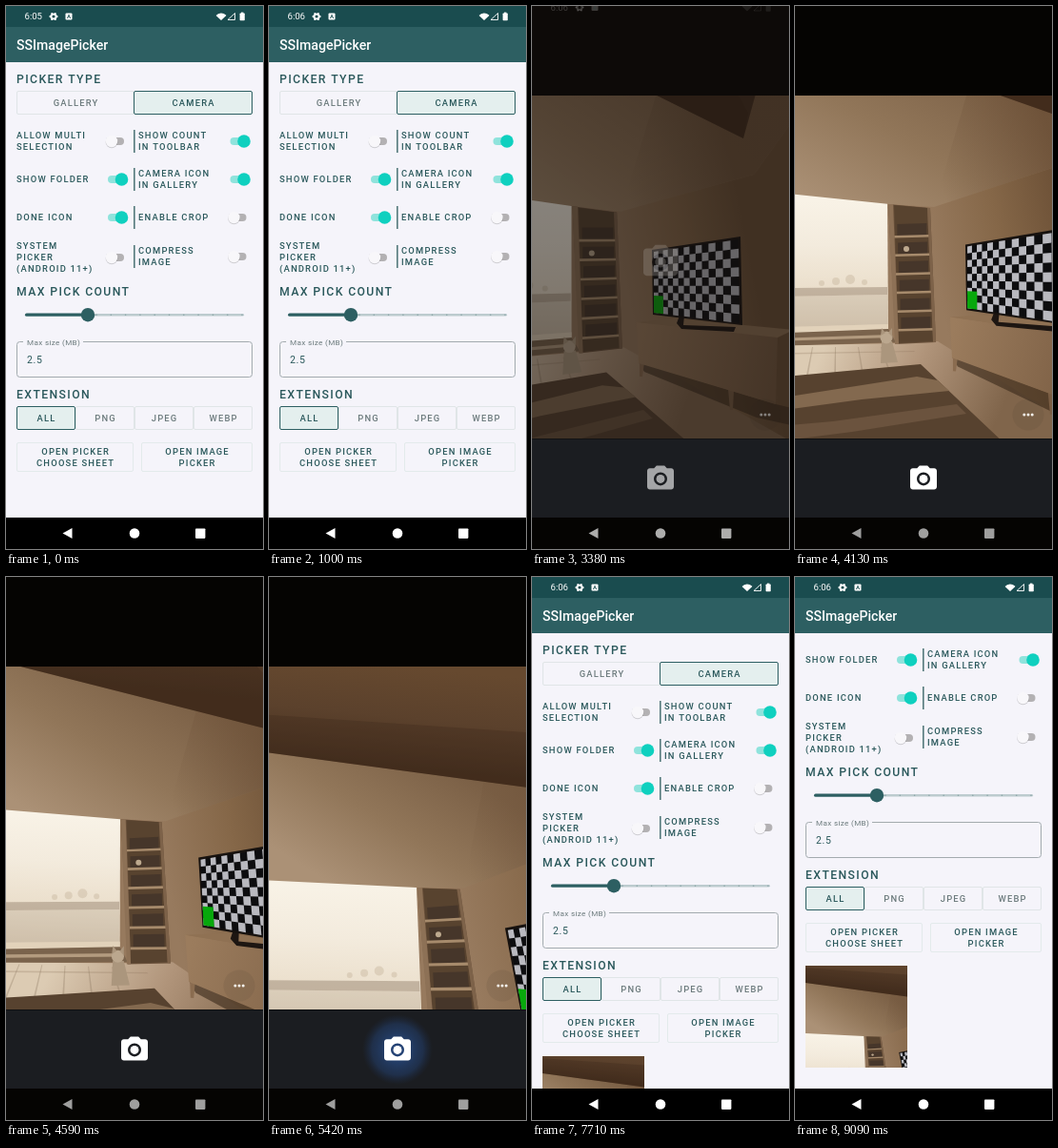
These frames come from a looping animation (270x570 px, 9.14 s). An HTML page with a canvas:

```html
<!DOCTYPE html>
<html lang="en">
<head>
<meta charset="utf-8">
<title>SSImagePicker</title>
<style>
html, body { margin: 0; width: 100%; height: 100%; overflow: hidden; background: #000; }
canvas { display: block; width: 270px; height: 570px; }
</style>
</head>
<body>
<canvas id="stage"></canvas>
<script>
const W = 270, H = 570, LOOP = 9140;
const canvas = document.getElementById('stage');
const ctx = canvas.getContext('2d');
const dpr = window.devicePixelRatio || 1;
canvas.width = W * dpr;
canvas.height = H * dpr;

const TEAL = '#2d5f62', DARK_TEAL = '#1a4c4f', INK = '#2a585b', GRAY = '#6b7a7c';
const PAPER = '#f5f4fa', SPLASH = '#1c2124', BAR = '#1b1d21', NIGHT = '#050402';

const clamp = v => Math.max(0, Math.min(1, v));
const span = (t, a, b) => clamp((t - a) / (b - a));
const lerp = (a, b, k) => a + (b - a) * k;
const easeOut = k => 1 - (1 - k) ** 3;
const easeInOut = k => k * k * (3 - 2 * k);

// ---------- drawing helpers ----------
function rect(x, y, w, h, color) {
  ctx.fillStyle = color;
  ctx.fillRect(x, y, w, h);
}
function disc(x, y, r, color) {
  ctx.fillStyle = color;
  ctx.beginPath();
  ctx.arc(x, y, r, 0, 7);
  ctx.fill();
}
function round(x, y, w, h, r, fill, stroke) {
  ctx.beginPath();
  ctx.roundRect(x, y, w, h, r);
  if (fill) { ctx.fillStyle = fill; ctx.fill(); }
  if (stroke) { ctx.strokeStyle = stroke; ctx.lineWidth = 1; ctx.stroke(); }
}
function shape(pts, color) {
  ctx.fillStyle = color;
  ctx.beginPath();
  pts.forEach(p => ctx.lineTo(p[0], p[1]));
  ctx.closePath();
  ctx.fill();
}
// y is the middle of the capital letters
function text(s, x, y, { size = 9.4, weight = 500, color = INK, gap = 1.2, align = 'left' } = {}) {
  ctx.font = `${weight} ${size}px Roboto, sans-serif`;
  ctx.letterSpacing = gap + 'px';
  ctx.textAlign = align;
  ctx.fillStyle = color;
  ctx.fillText(s, x, y + size * 0.355);
}
function layer(alpha, scale, draw) {
  if (alpha <= 0) return;
  ctx.save();
  ctx.globalAlpha *= alpha;
  ctx.translate(W / 2, H / 2);
  ctx.scale(scale, scale);
  ctx.translate(-W / 2, -H / 2);
  draw();
  ctx.restore();
}

// ---------- room seen by a turning camera ----------
const F = 263, CX = 135, CY = 274;
const START = [-0.2, 0.02], FRONT = [0, 0], UP = [0.22, 0.44];

function ray(x, y, [yaw, pitch]) {
  const u = x - CX, v = y - CY;
  const b = v * Math.cos(pitch) - F * Math.sin(pitch);
  const z = v * Math.sin(pitch) + F * Math.cos(pitch);
  return [u * Math.cos(yaw) - z * Math.sin(yaw), b, u * Math.sin(yaw) + z * Math.cos(yaw)];
}
function project([x, y, z], [yaw, pitch]) {
  const a = x * Math.cos(yaw) + z * Math.sin(yaw);
  const c = z * Math.cos(yaw) - x * Math.sin(yaw);
  const d = Math.max(5, c * Math.cos(pitch) - y * Math.sin(pitch));
  return [CX + F * a / d, CY + F * (y * Math.cos(pitch) + c * Math.sin(pitch)) / d];
}
function rays(view, ...n) {
  const out = [];
  for (let i = 0; i < n.length; i += 2) out.push(ray(n[i], n[i + 1], view));
  return out;
}
const front = (...n) => rays(FRONT, ...n);
const start = (...n) => rays(START, ...n);
const up = (...n) => rays(UP, ...n);

function cameraPose(t) {
  const [from, to, k] = t < 4130
    ? [START, FRONT, span(t, 3460, 4130)]
    : [FRONT, UP, span(t, 4160, 5280)];
  return [lerp(from[0], to[0], k), lerp(from[1], to[1], k)];
}

const mix = (a, b, k) => a.map((v, i) => lerp(v, b[i], k));

function room(pose) {
  const at = r => project(r, pose);
  const poly = (r, color) => shape(r.map(at), color);
  const grad = ([a, b], ...colors) => {
    const g = ctx.createLinearGradient(...at(a), ...at(b));
    colors.forEach((c, i) => g.addColorStop(i / (colors.length - 1), c));
    return g;
  };
  ctx.save();
  ctx.beginPath();
  ctx.rect(0, 94, W, 360);
  ctx.clip();

  rect(0, 94, W, 360, grad(front(145, 270, 290, 240), '#977a5e', '#856748', '#6c5036'));

  // ceiling and the dark beam above
  poly([...up(-60, 320), ...front(98, 208, 146, 211, 300, 160, 420, 0), ...up(320, 40, -40, 40)],
    grad(up(70, 325, 160, 180), '#ab9176', '#917659', '#7b6046'));
  poly(front(146, 211, 300, 160, 420, 0, 190, 60),
    grad(front(150, 180, 270, 140), 'rgba(120,92,66,0)', 'rgba(108,80,55,.85)'));
  poly([...up(-40, 179, -40, 40, 310, 40), ...start(244, 60, 222, 139)],
    grad(up(140, 94, 130, 200), '#66492f', '#5b412c', '#46301f'));
  poly([...up(-40, 179, -40, 142, 270, 163), ...start(227, 112, 222, 139)], 'rgba(55,35,22,.25)');

  // window
  poly([...up(-30, 317, 155, 326), ...front(98, 340, -80, 349)],
    grad(front(50, 205, 50, 342), '#f8f2e6', '#f3ebdd', '#ebdfcc', '#d6c6b0'));
  poly(front(-80, 297, 97, 295, 97, 303, -80, 306), 'rgba(160,142,122,.55)');
  poly(front(-80, 306, 97, 303, 97, 334, -80, 339), 'rgba(190,176,156,.35)');
  for (let i = 0; i < 4; i++) {
    const [x, y] = at(ray(28 + i * 15, 291 - (i * 7) % 5, FRONT));
    disc(x, y, 3 + i % 3, 'rgba(196,178,152,.4)');
  }
  poly(front(-80, 339, 98, 334, 98, 339, -80, 346), '#e2d2ba');
  poly(front(-80, 346, 98, 339, 106, 353, -80, 359), '#7a634c');
  poly(front(-80, 351, 100, 345, 102, 348, -80, 354), '#b39b7f');

  // floor and rug
  poly(front(-120, 359, 106, 354, 150, 352, 420, 520, 420, 560, -120, 560),
    grad(front(30, 360, 210, 440), '#dccbb3', '#b0947a', '#80654b'));
  for (let i = 0; i < 6; i++)
    poly(front(i * 24 - 30, 358, i * 24 - 29, 358, i * 30 - 47, 392, i * 30 - 49, 392), 'rgba(130,108,86,.3)');
  poly(front(-120, 366, 125, 362, 126, 363, -120, 368), 'rgba(130,108,86,.25)');
  poly(front(-120, 398, 0, 388, 132, 376, 240, 478, -120, 500), '#57422f');
  poly(front(-120, 421, 0, 409, 128, 389, 150, 393, 162, 404, 70, 413, -120, 439), '#83694f');
  poly(front(-120, 450, 40, 436, 170, 418, 180, 428, 60, 447, -120, 470), '#6b533e');

  // ladder shelf
  poly(front(98, 208, 142, 212, 148, 353, 106, 355), '#6b523c');
  poly(front(104, 209, 139, 212, 145, 352, 109, 354), '#58432f');
  const rowL = k => 103 + k * 6, rowR = k => 140 + k * 6;
  for (let i = 0; i < 6; i++) {
    const y = 241 + i * 19.6, k = (y - 208) / 146, l = rowL(k), r = rowR(k);
    poly(front(l + 3, y - 12, r - 3, y - 13, r - 3, y, l + 3, y), '#46362a');
    poly(front(l, y, r, y - 1, r, y + 1.5, l, y + 2.5), '#a78b6c');
  }
  disc(...at(ray(117, 255, FRONT)), 3, '#bda98e');
  poly(front(98, 208, 103, 208, 109, 355, 105, 355), '#8d7156');
  poly(front(139, 212, 142, 212, 148, 353, 145, 353), '#7d6249');

  // small pale figure
  poly(front(91, 352, 102, 352, 108, 374, 90, 375), '#ab967d');
  disc(...at(ray(96, 348, FRONT)), 6.5, '#bba78e');
  poly(front(90, 346, 91, 338, 95, 343), '#ab967d');
  poly(front(98, 343, 102, 338, 102, 347), '#ab967d');

  // cabinet and its shadow
  poly(start(112, 374, 256, 418, 300, 428, 300, 446, 236, 432, 118, 384), 'rgba(58,40,26,.6)');
  poly(start(113, 372, 118, 374, 116, 389, 113, 389), '#8a6c50');
  poly(start(206, 402, 212, 404, 211, 424, 208, 424), '#7a5d43');
  poly(start(110, 332, 258, 347, 256, 418, 112, 375), grad(start(112, 350, 256, 380), '#9b7c5d', '#775a40'));
  poly(start(110, 332, 150, 328, 275, 340, 258, 348), '#8f7153');

  // television with checkerboard
  poly(start(152, 333, 155, 325, 160, 325, 159, 335, 214, 337, 212, 342, 157, 339), '#1d1612');
  poly(start(126, 256, 219, 242, 221, 335, 127, 324), '#17120f');
  const [a, b, c, d] = start(128, 258, 217, 245, 218, 333, 128, 322);
  const far = r => r.map(v => v * 1.38);
  const A = far(a), D = far(d), COLS = 14, ROWS = 9;
  const cell = (u0, v0, u1, v1, color) => {
    const p = (u, v) => mix(mix(A, b, u), mix(D, c, u), v);
    poly([p(u0, v0), p(u1, v0), p(u1, v1), p(u0, v1)], color);
  };
  cell(0, 0, 1, 1, '#0d0d0f');
  for (let i = 0; i < COLS; i++)
    for (let j = i % 2; j < ROWS; j += 2)
      cell(i / COLS, j / ROWS, (i + 1) / COLS, (j + 1) / ROWS, '#b9b9bf');
  cell(0, 0.72, 0.145, 1, '#08a80c');
  ctx.restore();
}

// ---------- settings form ----------
function toggle(x, y, on) {
  round(x, y - 4, on ? 20 : 17, 8, 4, on ? '#8fe3dc' : '#b3b1b3');
  if (!on) disc(x + 4, y + 0.8, 6.4, 'rgba(0,0,0,.16)');
  disc(x + (on ? 14.5 : 4), y, on ? 6.8 : 6.2, on ? '#0fd0bf' : '#f8f7fa');
}
function option(x, y, lines, on) {
  lines.forEach((s, i) => text(s, x, y + (i - (lines.length - 1) / 2) * 12));
  toggle(x < 100 ? 107 : 235.5, y, on);
  if (x > 100) rect(134, y - 12, 1.6, 24, '#54797b');
}
function tab(x, y, w, label, active) {
  round(x + 0.5, y + 0.5, w - 1, 24, 1.5, active && '#e4efee', active ? TEAL : '#e0e5e7');
  text(label, x + w / 2 + 0.6, y + 13, { color: active ? INK : GRAY, align: 'center' });
}
const heading = (s, y) => text(s, 11, y, { size: 12.2, gap: 1.4 });

function action(x, w, lines) {
  round(x + 0.5, 458.5, w - 1, 30, 1.5, null, '#e3eaeb');
  lines.forEach((s, i) => text(s, x + w / 2 + 0.6, 468 + i * 12, { align: 'center' }));
}

function form(scroll, photo) {
  rect(0, 0, W, H, PAPER);
  ctx.save();
  ctx.beginPath();
  ctx.rect(0, 59, W, 478);
  ctx.clip();
  ctx.translate(0, -scroll);

  heading('PICKER TYPE', 77);
  tab(11, 89, 124, 'GALLERY', false);
  tab(134, 89, 125, 'CAMERA', true);
  option(11, 142, ['ALLOW MULTI', 'SELECTION'], false);
  option(139, 142, ['SHOW COUNT', 'IN TOOLBAR'], true);
  option(11, 182, ['SHOW FOLDER'], true);
  option(139, 182, ['CAMERA ICON', 'IN GALLERY'], true);
  option(11, 222, ['DONE ICON'], true);
  option(139, 222, ['ENABLE CROP'], false);
  option(11, 264, ['SYSTEM', 'PICKER', '(ANDROID 11+)'], false);
  option(139, 263, ['COMPRESS', 'IMAGE'], false);

  heading('MAX PICK COUNT', 300);
  round(86, 323, 164, 2.4, 1.2, '#bccbce');
  for (let i = 0; i < 11; i++) disc(95 + i * 15.3, 324.2, 0.8, '#8ba5a8');
  round(20, 322.6, 66, 3.2, 1.6, TEAL);
  disc(86, 324.2, 7.2, TEAL);

  round(11.5, 352.5, 247, 37, 3, null, '#a3abae');
  rect(18, 350, 63, 6, PAPER);
  text('Max size (MB)', 22, 353, { size: 8.1, weight: 400, color: GRAY, gap: 0.35 });
  text('2.5', 22, 371.5, { size: 10.5, weight: 400, gap: 0.7 });

  heading('EXTENSION', 408);
  ['ALL', 'PNG', 'JPEG', 'WEBP'].forEach((s, i) => tab(11 + i * 62, 420, 62, s, i === 0));

  action(11, 123, ['OPEN PICKER', 'CHOOSE SHEET']);
  action(142, 117, ['OPEN IMAGE', 'PICKER']);

  if (photo) {
    ctx.beginPath();
    ctx.rect(11, 503, 107, 107);
    ctx.clip();
    ctx.translate(11, 503);
    ctx.scale(107 / 270, 107 / 270);
    ctx.translate(0, -139);
    room(UP);
  }
  ctx.restore();

  rect(0, 0, W, 22, DARK_TEAL);
  rect(0, 22, W, 37, TEAL);
  text('SSImagePicker', 11, 41, { size: 14.1, color: '#fff', gap: 0 });
  rect(0, 537, W, 33, '#000');
}

// ---------- camera app ----------
const BODY = new Path2D('M9 2L7.17 4H4c-1.1 0-2 .9-2 2v12c0 1.1.9 2 2 2h16c1.1 0 2-.9 2-2V6c0-1.1-.9-2-2-2h-3.17L15 2H9z' +
  'M12 17a5 5 0 1 1 0-10a5 5 0 1 1 0 10z');

function cameraIcon(x, y, scale, color, alpha) {
  ctx.save();
  ctx.globalAlpha *= alpha;
  ctx.translate(x, y);
  ctx.scale(scale, scale);
  ctx.translate(-12, -11);
  ctx.fillStyle = color;
  ctx.fill(BODY, 'evenodd');
  disc(12, 12, 3.2, color);
  ctx.restore();
}

function cameraApp(t) {
  if (t < 3000) {
    rect(0, 0, W, H, SPLASH);
    cameraIcon(135, 267, 1.8, '#8d8c88', 0.6 * span(t, 2500, 2700));
    return;
  }
  const shown = span(t, 3180, 3580);
  rect(0, 0, W, H, NIGHT);
  room(cameraPose(t));
  disc(245, 429, 16.5, 'rgba(60,48,38,.1)');
  for (let i = -1; i < 2; i++) disc(245 + i * 4.2, 429, 1.5, '#f4f1ec');
  ctx.globalAlpha *= 1 - shown;
  rect(0, 0, W, 455, '#14100e');
  ctx.globalAlpha = 1;
  cameraIcon(135, 267, 1.8, '#a9a299', 0.6 * (1 - shown));

  rect(0, 454.5, W, 82.5, BAR);
  rect(0, 537, W, 33, NIGHT);
  const press = span(t, 5300, 5400) * (1 - span(t, 5480, 5750));
  if (press > 0) {
    const g = ctx.createRadialGradient(135, 496, 8, 135, 496, 37);
    g.addColorStop(0, 'rgba(40,80,145,.75)');
    g.addColorStop(0.65, 'rgba(36,66,115,.5)');
    g.addColorStop(1, 'rgba(30,50,85,0)');
    ctx.globalAlpha = press;
    disc(135, 496, 37, g);
    ctx.globalAlpha = 1;
  }
  cameraIcon(135, 495, 1.4, '#fff', lerp(0.2, 1, shown));
}

// ---------- system icons ----------
function statusIcons(time, dy, alpha, right) {
  if (alpha <= 0) return;
  ctx.save();
  ctx.translate(0, dy);
  ctx.globalAlpha = alpha;
  text(time, 19.5, 11, { size: 9.6, weight: 400, color: '#fff', gap: 0 });
  ctx.strokeStyle = '#fff';
  ctx.lineWidth = 2;
  ctx.beginPath();
  ctx.arc(50, 11, 2.6, 0, 7);
  ctx.stroke();
  for (let i = 0; i < 6; i++) {
    const a = i * Math.PI / 3;
    disc(50 + 3.7 * Math.cos(a), 11 + 3.7 * Math.sin(a), 0.9, '#fff');
  }
  round(62.5, 7.5, 7, 7, 1, '#fff');
  text('A', 66, 11, { size: 6, weight: 700, color: DARK_TEAL, gap: 0, align: 'center' });

  ctx.globalAlpha = alpha * right;
  ctx.fillStyle = '#fff';
  ctx.beginPath();
  ctx.moveTo(226, 15);
  ctx.arc(226, 15, 7.4, -Math.PI * 0.76, -Math.PI * 0.24);
  ctx.fill();
  ctx.strokeStyle = '#fff';
  ctx.lineWidth = 0.9;
  ctx.beginPath();
  ctx.moveTo(233, 14.5);
  ctx.lineTo(240.5, 14.5);
  ctx.lineTo(240.5, 7.5);
  ctx.closePath();
  ctx.stroke();
  rect(247, 6.6, 2.4, 1.4, '#fff');
  round(245.6, 7.6, 5.2, 7.6, 0.7, '#fff');
  ctx.restore();
}
function navIcons(alpha) {
  ctx.globalAlpha = alpha;
  shape([[59.5, 553.5], [69.5, 548], [69.5, 559]], '#fff');
  disc(135, 553.5, 5.3, '#fff');
  round(199, 548.5, 10.4, 10.4, 0.8, '#fff');
  ctx.globalAlpha = 1;
}

// ---------- timeline ----------
const OPEN = 1691, CLOSE = 6708;

function draw(t) {
  ctx.setTransform(dpr, 0, 0, dpr, 0, 0);
  ctx.globalAlpha = 1;
  rect(0, 0, W, H, '#000');
  const time = t < 1000 ? '6:05' : '6:06';
  let dy = 0, alpha = 1, right = 1, nav = 1;

  if (t < OPEN + 400) {
    const k = easeOut(span(t, OPEN, OPEN + 400));
    layer(1, lerp(1, 1.05, k), () => form(0, false));
    layer(span(t, OPEN + 30, OPEN + 110), lerp(0.85, 1, k), () => rect(0, 0, W, H, SPLASH));
    right = lerp(1, 0.4, span(t, OPEN, OPEN + 130));
  } else if (t < CLOSE) {
    cameraApp(t);
    const hide = span(t, 3250, 3470);
    dy = -16 * hide;
    alpha = 1 - 1.35 * hide;
    right = 0.4;
    nav = lerp(1, 0.62, span(t, 3150, 3420));
  } else {
    const k = easeOut(span(t, CLOSE, CLOSE + 400));
    const scroll = 95 * easeInOut(span(t, 7900, 8500));
    layer(1, lerp(1.05, 1, k), () => form(scroll, true));
    layer(1 - span(t, CLOSE + 15, CLOSE + 78), lerp(1, 0.85, k), () => {
      rect(0, 0, W, H, NIGHT);
      room(UP);
      rect(0, 454.5, W, 82.5, BAR);
      cameraIcon(135, 495, 1.4, '#fff', 1);
    });
    alpha = span(t, 6800, 7050);
    nav = lerp(0.62, 1, span(t, CLOSE, CLOSE + 160));
  }
  statusIcons(time, dy, alpha, right);
  navIcons(nav);
}

const began = performance.now();
function tick() {
  draw((performance.now() - began) % LOOP);
  requestAnimationFrame(tick);
}
tick();
</script>
</body>
</html>
```
